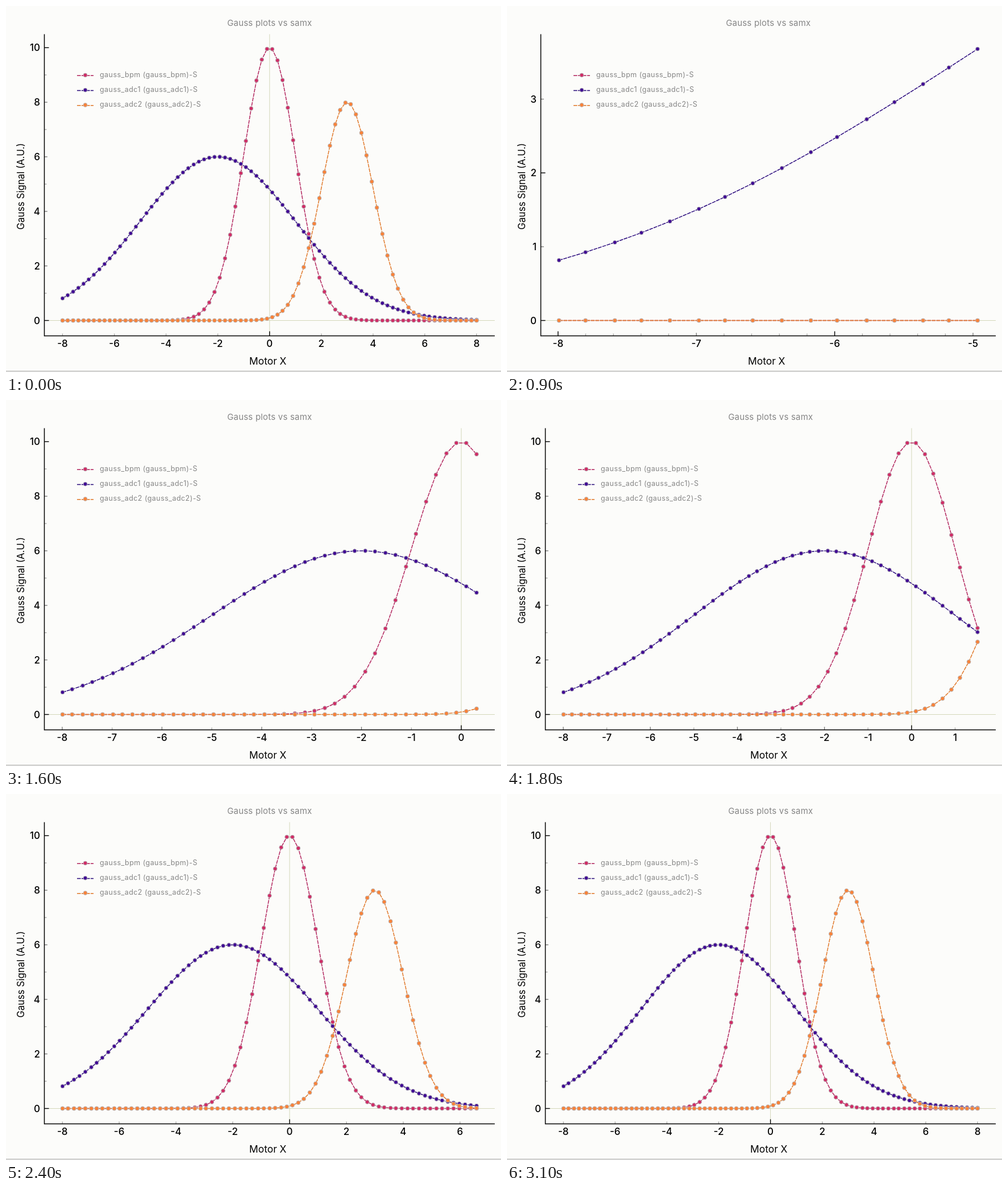
Animation of 871 by 643 pixels, one loop 3200 ms. Source, as an HTML page:

```html
<!DOCTYPE html>
<html lang="en">
<head>
<meta charset="utf-8">
<title>Gauss plots</title>
<style>
html, body { margin: 0; width: 100%; height: 100%; overflow: hidden; background: #fcfcfa; }
svg { display: block; width: 871px; height: 643px; font-family: Inter, "Open Sans", sans-serif; }
.axis { font-size: 17px; font-weight: 500; fill: #000; }
.name { font-size: 17.4px; fill: #000; }
.side { font-size: 16.7px; fill: #000; }
.title { font-size: 15px; letter-spacing: .2px; fill: #868686; }
.legend { font-size: 12.5px; letter-spacing: .45px; fill: #868686; }
.mid { text-anchor: middle; }
.end { text-anchor: end; }
.curve { fill: none; stroke-width: 1.45; stroke-dasharray: 6.6 1.4; }
.dot { stroke: #b8b8ba; stroke-width: 1; }
</style>
</head>
<body>
<svg id="plot" viewBox="0 0 871 643"></svg>
<script>
const plot = document.getElementById('plot');
const LOOP = 3200, STEP = 100, COUNT = 80, SCAN_START = 500;
const TOP = 49.5, BOTTOM = 579.5, RIGHT = 860, ZERO_Y = 552.5, MAX_Y = 75.5, LAST_X = 828;

const curves = [
  { name: 'gauss_bpm', amp: 10, mu: 0, sigma: 1, line: '#b0205a', fill: '#d02c66' },
  { name: 'gauss_adc1', amp: 6, mu: -2, sigma: 3, line: '#26057a', fill: '#400a94' },
  { name: 'gauss_adc2', amp: 8, mu: 3, sigma: 1, line: '#e07626', fill: '#fa8238' }
];
const gauss = (c, x) => c.amp * Math.exp(-((x - c.mu) ** 2) / (2 * c.sigma ** 2));

// Motor readback error of the running scan, in thousandths
const jitter = [
  7, -4, 6, -5, -1, 6, -8, -10, -2, 5, -8, 4, 2, 6, -10, -5, -7, -2, 6, -6, 6, 10,
  -6, 6, 7, -6, -1, -5, -9, -10, 0, -8, -1, -3, 7, 3, 4, -2, 7, 3, -1, 3, -7, 3,
  4, -2, -2, -3, 5, 10, -4, 3, -6, 0, 0, 3, -10, 10, -6, 0, 2, -9, -2, 8, -10, 5
];
const noise = i => {
  const v = Math.sin(i * 12.9898 + 4.1) * 43758.5453;
  return (v - Math.floor(v) - .5) * 12;
};
const positions = error => Array.from({ length: COUNT }, (_, i) =>
  -8 + 16 * i / (COUNT - 1) + error(i) / 1000);
const current = positions(i => jitter[i] || 0);
const previous = positions(i => i === 0 || i === COUNT - 1 ? 0 : noise(i));

// Time in ms and index of the newest point
const progress = [[500, 2], [700, 8], [1200, 26], [1600, 41], [2100, 56], [2400, 72], [2500, 76], [2600, 79]];
function newest(t) {
  for (let k = 1; k < progress.length; k++) {
    const [t0, a] = progress[k - 1], [t1, b] = progress[k];
    if (t <= t1) return Math.round(a + (b - a) * (t - t0) / (t1 - t0));
  }
  return COUNT - 1;
}

const textWidth = s => [...s].reduce((w, ch) => w + (ch === '-' ? 7 : ch === '.' ? 5 : 10), 0);
const textHeight = () => 16;
const limits = [[0, .7], [2, .6], [4, .4], [6, .2]];

// Up to three tick levels; finer levels get text only while there is room
function makeTicks(lo, hi, size, measure) {
  const span = hi - lo, best = span / Math.log(size);
  const unit = 10 ** Math.floor(Math.log10(best));
  const steps = [1, 2, 10, 20, 100].map(m => m * unit);
  let k = 0;
  while (steps[k + 1] <= best) k++;
  const levels = [steps[k + 2], steps[k + 1]];
  if (span / steps[k] <= size / Math.min(size / 20, 30)) levels.push(steps[k]);

  const ticks = [];
  let used = 0, labelled = 0, full = false;
  levels.forEach((step, level) => {
    const places = Math.max(0, Math.ceil(-Math.log10(step) - 1e-9));
    const fresh = [];
    for (let n = Math.ceil(lo / step); n * step <= hi; n++) {
      const value = n * step;
      if (ticks.some(o => Math.abs(o.value - value) < step * .01)) continue;
      fresh.push({ value, level, text: n === 0 ? '0' : value.toFixed(places) });
    }
    used += fresh.reduce((sum, o) => sum + measure(o.text), 0);
    if (level && limits.some(([n, max]) => labelled >= n && used / size >= max)) full = true;
    if (full) fresh.forEach(o => { o.text = ''; });
    labelled += fresh.length;
    ticks.push(...fresh);
  });
  return ticks;
}

const f = v => v.toFixed(1);
const line = (x1, y1, x2, y2, stroke, extra = '') =>
  `<line x1="${f(x1)}" y1="${f(y1)}" x2="${f(x2)}" y2="${f(y2)}" stroke="${stroke}" ${extra}/>`;
const text = (x, y, cls, s, extra = '') =>
  `<text x="${f(x)}" y="${f(y)}" class="${cls}" ${extra}>${s}</text>`;
const dot = (x, y, fill) => `<circle class="dot" cx="${f(x)}" cy="${f(y)}" r="3.4" fill="${fill}"/>`;

function draw(t) {
  const xs = t < SCAN_START ? previous : current.slice(0, newest(t) + 1);
  const peak = Math.max(...curves.flatMap(c => xs.map(x => gauss(c, x))));
  const perY = (ZERO_Y - MAX_Y) / peak;
  const py = v => ZERO_Y - v * perY;
  const yTicks = makeTicks((ZERO_Y - BOTTOM) / perY, (ZERO_Y - TOP) / perY, BOTTOM - TOP, textHeight);

  // The axis makes room for its longest label
  const left = 51.5 + 8 * Math.max(...yTicks.map(o => o.text.length));
  const first = xs[0], perX = (LAST_X - left - 32) / (xs[xs.length - 1] - first);
  const px = v => left + 32 + (v - first) * perX;
  const xTicks = makeTicks(first - 32 / perX, first + (RIGHT - left - 32) / perX, RIGHT - left, textWidth);
  const centre = (left + RIGHT) / 2;

  let out = '<rect width="871" height="643" fill="#fcfcfa"/>';
  out += line(0, 641.5, 871, 641.5, '#a0a0a0');
  out += line(left, ZERO_Y, RIGHT, ZERO_Y, '#d3d7b9');
  if (px(0) < RIGHT) out += line(px(0), TOP, px(0), BOTTOM, '#d3d7b9');

  for (const c of curves) {
    const pts = xs.map(x => [px(x), py(gauss(c, x))]);
    out += `<polyline class="curve" stroke="${c.line}" points="${pts.map(p => p.map(f).join()).join(' ')}"/>`;
    out += pts.map(p => dot(p[0], p[1], c.fill)).join('');
  }

  const tickStyle = level => `stroke-width="1.4" stroke-opacity="${(1 / (level + 1)).toFixed(2)}"`;
  const tickLength = level => 8 / (1 + level / 2);
  for (const o of yTicks) {
    const y = py(o.value);
    out += line(left, y, left + tickLength(o.level), y, '#000', tickStyle(o.level));
    if (o.text) out += text(left - 7.5, y + 6.2, 'axis end', o.text);
  }
  for (const o of xTicks) {
    const x = px(o.value);
    out += line(x, BOTTOM, x, BOTTOM - tickLength(o.level), '#000', tickStyle(o.level));
    if (o.text) out += text(x, 599, 'axis mid', o.text);
  }
  out += line(left, TOP, left, BOTTOM + .7, '#000', 'stroke-width="1.5"');
  out += line(left, BOTTOM, RIGHT, BOTTOM, '#000', 'stroke-width="1.5"');

  curves.forEach((c, i) => {
    const y = 121.5 + i * 26.2;
    out += line(left + 57.5, y + .8, left + 86.5, y + .8, c.line, 'class="curve"');
    out += dot(left + 72, y, c.fill);
    out += text(left + 97.5, y + 3.3, 'legend', `${c.name} (${c.name})-S`);
  });

  out += text(centre, 34.5, 'title mid', 'Gauss plots vs samx');
  out += text(centre - 3, 630, 'name mid', 'Motor X');
  out += text(0, 0, 'side mid', 'Gauss Signal (A.U.)', 'transform="translate(31.5 317) rotate(-90)"');
  plot.innerHTML = out;
}

let shown = -1;
const begin = performance.now();
function tick() {
  const t = Math.floor((performance.now() - begin) % LOOP / STEP) * STEP;
  if (t !== shown) draw(shown = t);
  requestAnimationFrame(tick);
}
tick();
</script>
</body>
</html>
```
